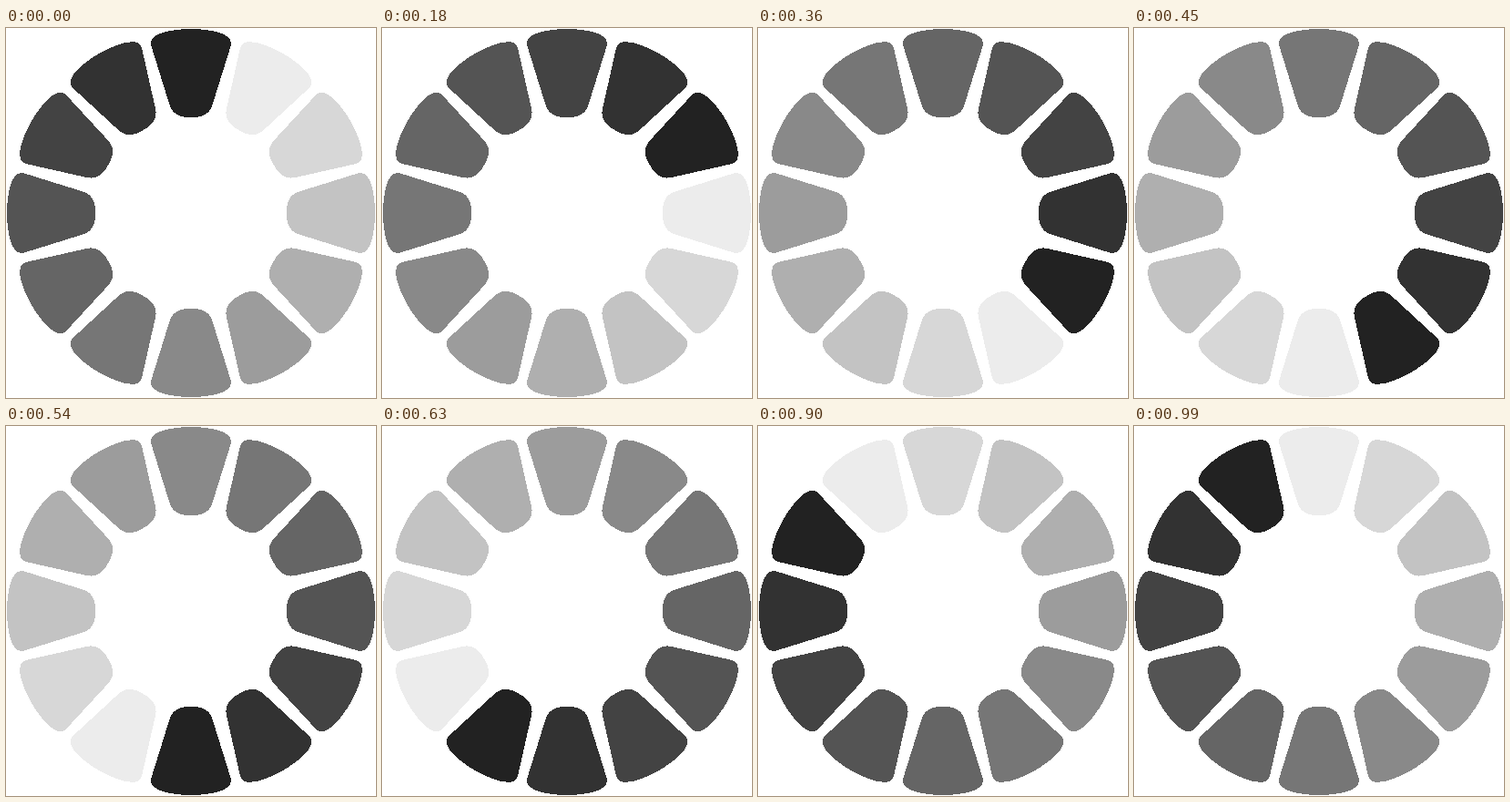
An HTML page for the animation above (1080 ms loop, 406 px wide and 406 px high).

```html
<!DOCTYPE html>
<html lang="en">
<head>
<meta charset="utf-8">
<title>Spinner</title>
<style>
html, body { margin: 0; height: 100%; overflow: hidden; background: #fff; }
svg { display: block; width: 100%; height: 100%; }
</style>
</head>
<body>
<svg viewBox="-203 -203 406 406" shape-rendering="crispEdges"></svg>
<script>
const COUNT = 12, STEP = 90;
// Grey levels from the head of the spinner back to its tail
const greys = [34, 50, 67, 84, 101, 118, 137, 156, 175, 195, 215, 236];
const half = s => `C${18 * s} -202 ${43.5 * s} -198 ${44 * s} -187
  C${44 * s} -185 ${43.5 * s} -183 ${42.6 * s} -180 L${23.6 * s} -119
  C${19.6 * s} -106 ${9 * s} -105 0 -105`;
const shape = `M0 -202 ${half(1)} L0 -202 ${half(-1)} Z`;

const svg = document.querySelector('svg');
const petals = greys.map((_, i) => {
  const petal = document.createElementNS('http://www.w3.org/2000/svg', 'path');
  petal.setAttribute('d', shape);
  petal.setAttribute('transform', `rotate(${i * 360 / COUNT})`);
  return svg.appendChild(petal);
});

function draw() {
  const head = Math.floor(performance.now() / STEP) % COUNT;
  petals.forEach((petal, i) => {
    const g = greys[(head - i + COUNT) % COUNT];
    petal.setAttribute('fill', `rgb(${g},${g},${g})`);
  });
  requestAnimationFrame(draw);
}
draw();
</script>
</body>
</html>
```
